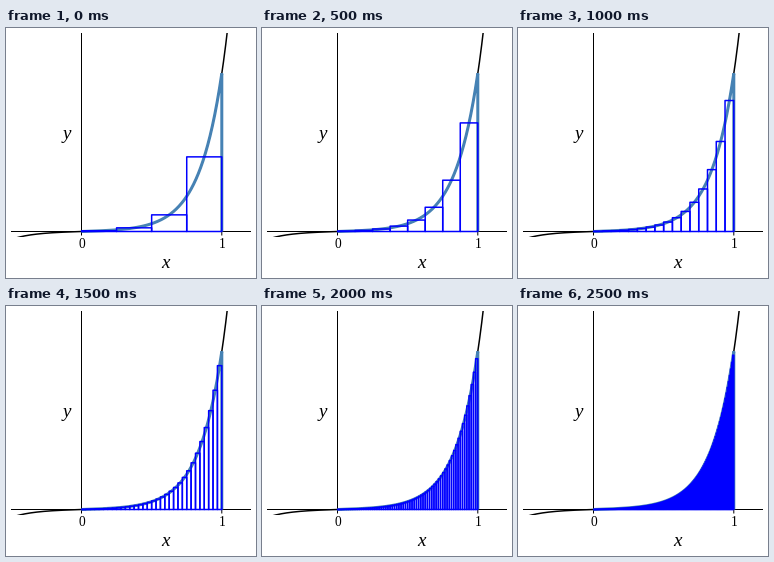
Write a matplotlib script that moves like this. It is 250 by 250 pixels and loops after 3000 ms.

```python
import numpy as np
import matplotlib.pyplot as plt
from matplotlib.animation import FuncAnimation
from matplotlib.collections import PolyCollection
from matplotlib.patches import Rectangle

SIZE, DPI = 250, 100
X0, Y0 = 75.5, 203.5          # origin of the plot in pixels
UNIT, HEIGHT = 140.3, 158     # pixel width of [0, 1], curve height at x = 1


def pt(px):
    return px * 72 / DPI


def sx(x):
    return X0 + UNIT * np.asarray(x)


def sy(x):
    return Y0 - HEIGHT * np.sinh(6 * np.asarray(x)) / np.sinh(6)


fig = plt.figure(figsize=(SIZE / DPI, SIZE / DPI), dpi=DPI, facecolor="white")
ax = fig.add_axes([0, 0, 1, 1])
ax.set_xlim(0, SIZE)
ax.set_ylim(SIZE, 0)
ax.axis("off")


def line(xs, ys, color="black", width=1, z=1, join="miter"):
    return ax.plot(xs, ys, color=color, lw=pt(width), zorder=z, snap=False,
                   solid_capstyle="butt", solid_joinstyle=join)[0]


def label(x, y, text, size, style="normal"):
    ax.text(x, y, text, family="Liberation Serif", style=style,
            fontsize=pt(size), ha="center", va="baseline")


# Axes, ticks and labels
line([5, 245], [Y0, Y0])
line([X0, X0], [5, Y0])
for value in (0, 1):
    line([sx(value)] * 2, [Y0, Y0 + 4])
    label(sx(value), 220, str(value), 13.5)
label(60.5, 111, "y", 19, "italic")
label(159.5, 240, "x", 19, "italic")

# Whole curve, cut off at the plot window
t = np.linspace(-0.5, 1.1, 400)
curve = line(sx(t), sy(t), width=1.5, z=2, join="round")
curve.set_clip_path(Rectangle((5, 5), 240, 204.3, transform=ax.transData))

# Part being integrated, closed at x = 1
u = np.linspace(0, 1, 300)
line(np.append(sx(u), sx(1)), np.append(sy(u), Y0),
     "steelblue", 3, z=3, join="bevel")

bars = PolyCollection([], facecolors="none", edgecolors="blue",
                      linewidths=pt(1.5), zorder=4, snap=False)
ax.add_collection(bars)


def draw(i):
    """Midpoint rectangles, doubled in number at each step."""
    n = 4 * 2 ** i
    edges = sx(np.arange(n + 1) / n)
    tops = sy((np.arange(n) + 0.5) / n)
    bars.set_verts([[(a, Y0), (a, top), (b, top), (b, Y0)]
                    for a, b, top in zip(edges, edges[1:], tops)])
    return [bars]


anim = FuncAnimation(fig, draw, frames=6, interval=500, repeat=True,
                     repeat_delay=0)
plt.show()
```
